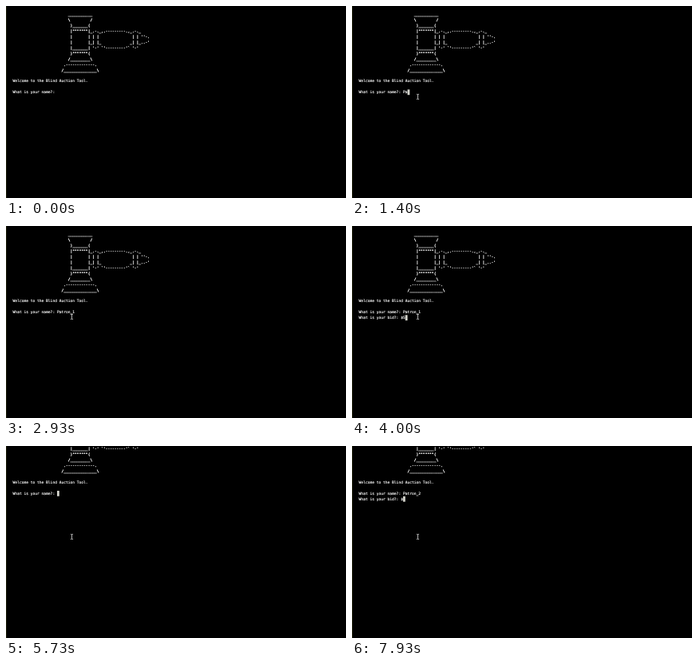
Write an HTML page that moves like this. It is 426 px wide and 240 px high and loops after 8000 ms.

```html
<!DOCTYPE html>
<html lang="en">
<head>
<meta charset="utf-8">
<title>Blind Auction Tool</title>
<style>
  html, body { margin: 0; width: 100%; height: 100%; overflow: hidden; background: #000; }
  svg { display: block; width: 100vw; height: 100vh; }
  text {
    font: 4.6px "DejaVu Sans Mono", monospace;
    fill: #fff;
    stroke: #fff;
    stroke-width: .14px;
    white-space: pre;
    text-rendering: geometricPrecision;
  }
  .art { stroke-width: .3px; }
</style>
</head>
<body>
<svg viewBox="0 0 426 240" preserveAspectRatio="none">
  <rect width="426" height="240"/>
  <rect width="1" height="240" fill="#1c1e0a"/>
  <g id="screen"></g>
  <rect id="block" width="2.8" height="6.8" fill="#d4d4cc"/>
  <path id="beam" d="M81 110.3h1l.5.5.5-.5h1M82.5 110.8v5.2M81 116.5h1l.5-.5.5.5h1" fill="none" stroke="#e4e4e4" stroke-width=".8"/>
</svg>
<script>
const LOOP = 8000, LEFT = 8.6, CHAR = 2.769, LINE = 6.92, BASE = 12.3;
const BLINK = 600, BEAM_IN = 500, NEXT_ROUND = 5140, SCROLL = 7;

const gavel = [
  [25, '___________'],
  [25, '\\         /'],
  [26, ')_______('],
  [26, '|"""""""|_.-._,.---------.,_.-._'],
  [26, "|       | | |               | | ''-."],
  [26, "|       |_| |_             _| |_..-'"],
  [26, "|_______| '-' `'---------'` '-'"],
  [26, ')"""""""('],
  [25, '/_________\\'],
  [23, '.-------------.'],
  [22, '/_______________\\']
].map(([indent, s]) => ' '.repeat(indent) + s);
const header = [...gavel, '', 'Welcome to the Blind Auction Tool.', ''];

const NAME = 'What is your name?: ', BID = '\nWhat is your bid?: $';
const keys = (start, step, s) => [...s].map((c, i) => [start + i * step, c]);

const rounds = [
  [[-1100, NAME], ...keys(1270, 130, 'Patron'), [2130, '_'], [2270, '1'], [3200, BID], [3800, '5']],
  [[NEXT_ROUND, NAME], ...keys(6130, 130, 'Patron'), [6970, '_'], [7200, '2'], [7470, BID]]
];

const NS = 'http://www.w3.org/2000/svg';
const byId = id => document.getElementById(id);
const screen = byId('screen'), block = byId('block'), beam = byId('beam');

const rows = Array.from({ length: header.length + 2 }, (_, i) => {
  const row = document.createElementNS(NS, 'text');
  row.setAttribute('x', LEFT);
  row.setAttribute('y', BASE + i * LINE);
  if (i < gavel.length) row.setAttribute('class', 'art');
  return screen.appendChild(row);
});

function setText(el, s) {
  if (el.textContent !== s) el.textContent = s;
}

function draw(t) {
  const second = t >= NEXT_ROUND;
  const done = rounds[+second].filter(([at]) => at <= t);
  const input = done.map(e => e[1]).join('').split('\n');
  const lines = [...header, ...input];
  const top = second ? SCROLL : 0;

  // The row just above the top edge is out of view as well.
  rows.forEach((row, i) => {
    setText(row, lines[i] || '');
    row.style.display = i < top - 1 ? 'none' : '';
  });
  screen.setAttribute('transform', `translate(0 ${-top * LINE})`);

  const sinceKey = t - done[done.length - 1][0];
  block.setAttribute('x', LEFT + input[input.length - 1].length * CHAR);
  block.setAttribute('y', BASE + (lines.length - 1 - top) * LINE - 4.8);
  block.style.display = sinceKey % (2 * BLINK) < BLINK ? '' : 'none';
  beam.style.display = t >= BEAM_IN ? '' : 'none';
}

const begin = performance.now();
function tick() {
  draw((performance.now() - begin) % LOOP);
  requestAnimationFrame(tick);
}
tick();
</script>
</body>
</html>
```
